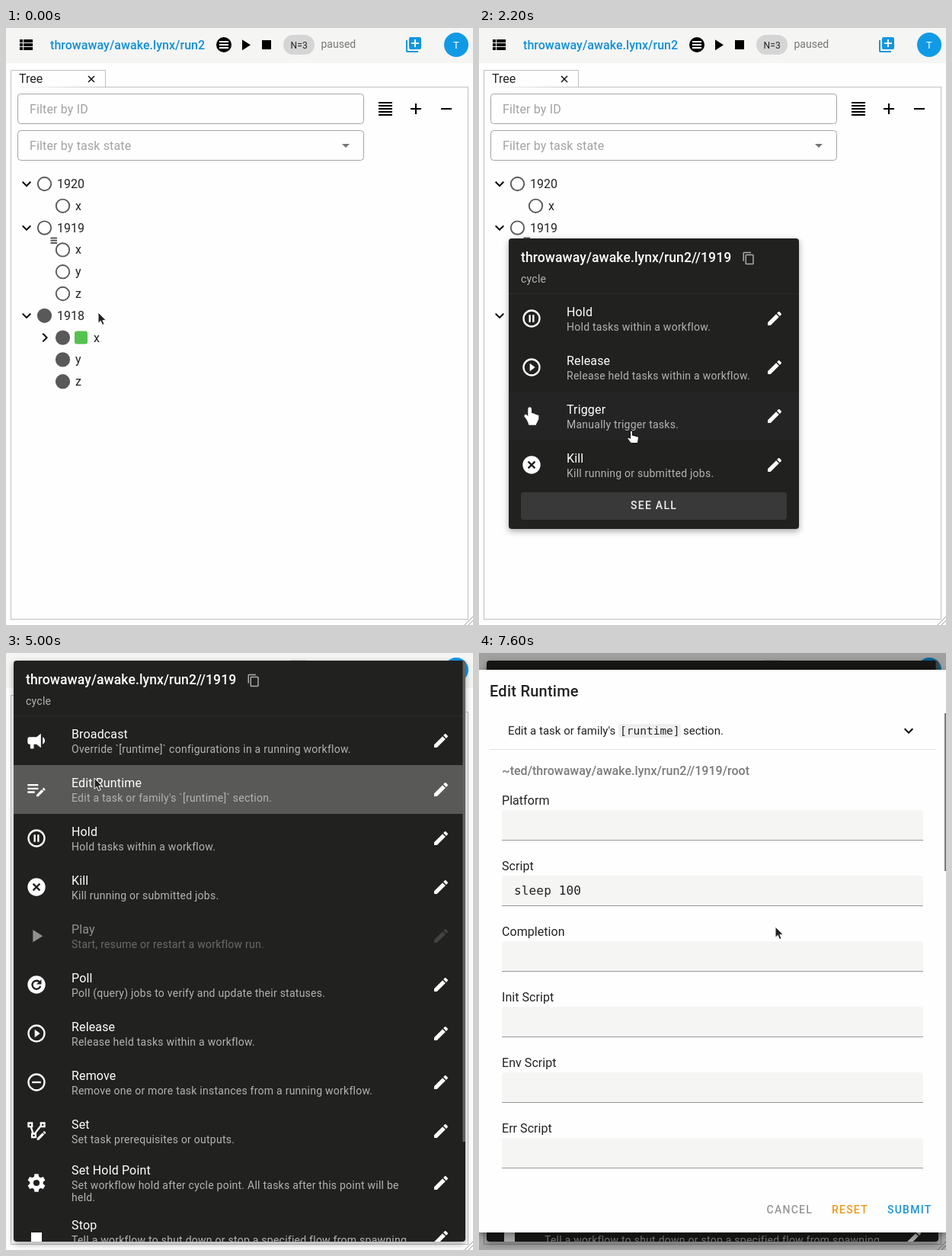
Recreate the animation shown at these times as an HTML page. Size 613x783 px, loop 8 s.

```html
<!DOCTYPE html>
<html lang="en">
<head>
<meta charset="utf-8">
<title>Workflow tree</title>
<style>
html, body { margin: 0; width: 100%; height: 100%; overflow: hidden; background: #fefefe; }
svg { display: block; width: 613px; height: 783px; font-family: Roboto, sans-serif; }
text { white-space: pre; }
.mono { font-family: "DejaVu Sans Mono", monospace; }
.card { filter: drop-shadow(0 3px 4px rgba(0,0,0,.35)); }
</style>
</head>
<body>
<svg id="stage" viewBox="0 0 613 783"></svg>
<script>
const INK = '#222', BLUE = '#1190d8', GREY = '#595959', DARK = '#212120';

const text = (x, y, s, size = 16, fill = INK, o = '') =>
  `<text x="${x}" y="${y}" font-size="${size}" fill="${fill}" ${o}>${s}</text>`;
const rect = (x, y, w, h, fill, o = '') =>
  `<rect x="${x}" y="${y}" width="${w}" height="${h}" fill="${fill}" ${o}/>`;
const path = (d, o = '') => `<path d="${d}" ${o}/>`;
const ring = (cx, cy, r, w) =>
  `<circle cx="${cx}" cy="${cy}" r="${r}" fill="none" stroke="currentColor" stroke-width="${w}"/>`;
const sp = n => `letter-spacing="${n}"`;
const medium = (n = 0) => `font-weight="500" ${sp(n)}`;

const pencil = 'M20.7 7c.4-.4.4-1 0-1.4l-2.3-2.3c-.4-.4-1-.4-1.4 0l-1.9 1.8 3.8 3.8M3 17.25V21h3.75L17.8 9.93l-3.74-3.75Z';
const disc = '<circle cx="12" cy="12" r="10"/>';
const teeth = [0, 60, 120].map(a =>
  `<path d="M9.8 2h4.4l.9 5v10l-.9 5H9.8l-.9-5V7Z" transform="rotate(${a} 12 12)"/>`).join('');

const icons = {
  pencil: path(pencil),
  views: path('M9 5v4h12V5M9 19h12v-4H9M9 14h12v-4H9M4 9h4V5H4M4 19h4v-4H4M4 14h4v-4H4'),
  play: path('M8 5.14v14l11-7Z'),
  stop: path('M6 6h12v12H6Z'),
  lines: path('M3 3h18v2H3ZM3 7h18v2H3ZM3 11h18v2H3ZM3 15h18v2H3ZM3 19h18v2H3Z'),
  plus: path('M19 13h-6v6h-2v-6H5v-2h6V5h2v6h6Z'),
  minus: path('M19 13H5v-2h14Z'),
  down: path('M7.4 8.6 12 13.2l4.6-4.6L18 10l-6 6-6-6Z'),
  right: path('M8.6 16.6 13.2 12 8.6 7.4 10 6l6 6-6 6Z'),
  addTab: path('M19 11h-4v4h-2v-4H9V9h4V5h2v4h4M20 2H8a2 2 0 0 0-2 2v12a2 2 0 0 0 2 2h12a2 2 0 0 0 2-2V4a2 2 0 0 0-2-2M4 6H2v14a2 2 0 0 0 2 2h14v-2H4Z', 'fill-rule="evenodd"'),
  menu: disc + path('M6 8h12M6 12h12M6 16h12', 'stroke="#fff" stroke-width="2"'),
  copy: path('M19 21H8V7h11m0-2H8a2 2 0 0 0-2 2v14a2 2 0 0 0 2 2h11a2 2 0 0 0 2-2V7a2 2 0 0 0-2-2m-3-4H4a2 2 0 0 0-2 2v14h2V3h12Z'),
  Broadcast: path('M12 8H4a2 2 0 0 0-2 2v4a2 2 0 0 0 2 2h1v4a1 1 0 0 0 1 1h2a1 1 0 0 0 1-1v-4h3l5 4V4l-5 4m9.5 4c0 1.7-1 3.3-2.5 4V8c1.5.8 2.5 2.3 2.5 4Z'),
  'Edit Runtime': path('M2 6v2h12V6H2m0 4v2h12v-2H2m18-.1-1.4 1.4 2.1 2.1 1.2-1.2V11.7L20.4 10.2M18 11.9l-6 6V20h2.1l6-6-2.1-2.1M2 14v2h8v-2Z'),
  Hold: ring(12, 12, 9, 2) + path('M9 8h2v8H9Zm4 0h2v8h-2Z'),
  Kill: disc + path('M8.2 8.2l7.6 7.6m0-7.6-7.6 7.6', `stroke="${DARK}" stroke-width="2"`),
  Play: path('M8 5.14v14l11-7Z'),
  Poll: disc + path('M15.6 9.2A4.7 4.7 0 1 0 16.5 13.5', `fill="none" stroke="${DARK}" stroke-width="2"`) +
    path('M17.5 6v5.5H12Z', `fill="${DARK}"`),
  Release: ring(12, 12, 9, 2) + path('M10 7.5v9l6-4.5Z'),
  Remove: ring(12, 12, 9, 2) + path('M7 11h10v2H7Z'),
  Trigger: path('M10 2a2 2 0 0 1 2 2v4.5s2-.25 2 .75c0 0 2-.25 2 .75 0 0 2-.25 2 .75 0 0 2-.25 2 .75V15c0 1-3 6-3 7H9s-2-7-5-9c0 0-1-6 4-1V4a2 2 0 0 1 2-2Z'),
  Set: path('M3 3h4v4H3ZM17 3h4v4h-4ZM7 15h4v4H7ZM5.6 7l2.7 8M17 6l-7 9', 'fill="none" stroke="currentColor" stroke-width="2"') +
    `<g transform="translate(11 10.5) scale(.55)">${path(pencil)}</g>`,
  'Set Hold Point': teeth + `<circle cx="12" cy="12" r="7.5"/><circle cx="12" cy="12" r="3.5" fill="${DARK}"/>`,
  Stop: path('M6 6h12v12H6Z')
};
const icon = (name, cx, cy, color = '#000', size = 24) => {
  const s = size / 24;
  return `<g transform="translate(${cx - 12 * s} ${cy - 12 * s}) scale(${s})" fill="${color}" color="${color}">${icons[name]}</g>`;
};

// Main page
const node = (row, depth, label, full, arrow, job) => {
  const y = 204.5 + row * 28.8, x = 50.5 + depth * 24;
  return (arrow ? icon(arrow, x - 23.5, y) : '') +
    (full ? `<circle cx="${x}" cy="${y}" r="9.6" fill="${GREY}"/>`
      : `<g color="${GREY}">${ring(x, y, 8.7, 1.9)}</g>`) +
    (job ? rect(x + 15.5, y - 8.5, 17, 17, '#55c24f', 'rx="3"') : '') +
    text(x + (job ? 40.5 : 16.5), y + 5.5, label);
};
const edge = 'stroke="#c0c0c0"';
const page = rect(0, 0, 613, 783, '#fefefe') + rect(0, 0, 613, 46, '#f5f5f4') +
  icon('views', 26, 22) + text(58, 28, 'throwaway/awake.lynx/run2', 16, BLUE, medium(.05)) +
  icon('menu', 286, 22) + icon('play', 314, 22) + icon('stop', 342, 22) +
  rect(364, 9, 41, 26, '#d5d5d5', 'rx="13"') + text(373.5, 27, 'N=3', 12, INK, sp(.2)) +
  text(413.5, 26, 'paused', 14, '#757575') + icon('addTab', 535, 22, '#1097e0') +
  '<circle cx="591" cy="22" r="16" fill="#109ae6"/>' + text(591, 27, 'T', 13, '#fff', 'text-anchor="middle"') +
  rect(6.5, 77.5, 600, 698, 'none', edge) + path('M6.5 78V55.5h124V77', `fill="#fefefe" ${edge}`) +
  text(17, 72, 'Tree') + path('M108 63l8 8m0-8-8 8', 'stroke="#111" stroke-width="1.5"') +
  [86.5, 134.5].map(y => rect(15.5, y, 454, 39, 'none', 'rx="4" stroke="#a4a4a4"')).join('') +
  text(31, 112, 'Filter by ID', 16, '#a2a2a2', sp(.15)) + text(31, 160, 'Filter by task state', 16, '#a2a2a2', sp(.15)) +
  path('M441 152h10l-5 5Z', 'fill="#757575"') +
  icon('lines', 498, 106) + icon('plus', 538, 106) + icon('minus', 578, 106) +
  node(0, 0, '1920', 0, 'down') + node(1, 1, 'x') + node(2, 0, '1919', 0, 'down') +
  path('M58.5 275.5h8.5M58.5 278.7h8.5M58.5 281.9h8.5', `stroke="${GREY}" stroke-width="2"`) +
  node(3, 1, 'x') + node(4, 1, 'y') + node(5, 1, 'z') +
  node(6, 0, '1918', 1, 'down') + node(7, 1, 'x', 1, 'right', 1) + node(8, 1, 'y', 1) + node(9, 1, 'z', 1) +
  path('M602 783l11-11M607 783l6-6', 'stroke="#999"');

// Command menus
const about = {
  Broadcast: ['Override `[runtime]` configurations in a running workflow.'],
  'Edit Runtime': ["Edit a task or family's `[runtime]` section."],
  Hold: ['Hold tasks within a workflow.'],
  Kill: ['Kill running or submitted jobs.'],
  Play: ['Start, resume or restart a workflow run.'],
  Poll: ['Poll (query) jobs to verify and update their statuses.'],
  Release: ['Release held tasks within a workflow.'],
  Remove: ['Remove one or more task instances from a running workflow.'],
  Set: ['Set task prerequisites or outputs.'],
  'Set Hold Point': ['Set workflow hold after cycle point. All tasks after this point will be', 'held.'],
  Stop: ['Tell a workflow to shut down or stop a specified flow from spawning', 'new tasks.'],
  Trigger: ['Manually trigger tasks.']
};
const menu = (id, w, h, names) => {
  let y = 73;
  const rows = names.map(name => {
    const lines = about[name], tall = lines.length > 1, off = name === 'Play';
    const mid = y + (tall ? 36 : 32);
    y += tall ? 72 : 64;
    return `<g opacity="${off ? .5 : 1}">` + icon(name, 30, mid, '#fff', 28) +
      text(76, mid - (tall ? 11 : 3), name, 16, '#fff', sp(.15)) +
      lines.map((s, i) => text(76, mid + (tall ? 8 : 16) + i * 16, s, 14, '#b3b3b2', sp(.25))).join('') +
      `<g opacity="${off ? .3 : 1}">${icon('pencil', w - 32, mid, '#fff')}</g></g>`;
  }).join('');
  return `<g id="${id}"><g class="card">${rect(0, 0, w, h, DARK, 'rx="4"')}</g>` +
    `<clipPath id="${id}Clip">${rect(0, 0, w, h, '#000', 'rx="4"')}</clipPath><g clip-path="url(#${id}Clip)">` +
    rect(0, 0, w, 64, '#fff', `id="${id}Hover" opacity="0"`) +
    text(16, 31, 'throwaway/awake.lynx/run2//1919', 17.6, '#fff', medium(.08)) +
    icon('copy', w === 381 ? 315 : 315, 26, '#aaa', 18) +
    text(16, 57.5, 'cycle', 14, '#b3b3b2', sp(.25)) + rect(0, 72, w, 1, '#2d2d2c') + rows +
    (id === 'small' ? rect(16, 333, 349, 36, '#383938', 'rx="4" id="seeAll"') +
      text(190.6, 355, 'SEE ALL', 14, '#eee', medium(1.25) + ' text-anchor="middle"')
      : rect(589.5, 0, 3.5, 631, '#626262', 'id="bar"')) + '</g></g>';
};

// Edit dialog
const fields = ['Platform', 'Script', 'Completion', 'Init Script', 'Env Script', 'Err Script'];
const field = (name, i) => {
  const y = 206 + i * 86;
  return text(30, y - 7, name, 16, INK, sp(.05)) +
    path(`M30 ${y + 39}V${y + 4}q0-4 4-4H579q4 0 4 4V${y + 39}Z`, `id="field${i}" fill="#f5f5f4"`) +
    rect(30, y + 39, 553, 1, '#989898');
};
const place = fill => text(30, 160, '~ted/throwaway/awake.lynx/run2//1919/root', 16, fill, medium(.02));
const dialog = '<g id="dialog">' +
  `<g class="card">${rect(-2, 22, 617, 738, '#fefefe', 'rx="4"')}</g>` +
  text(14, 56.7, 'Edit Runtime', 20, INK, medium(.25)) +
  text(38, 107, "Edit a task or family's", 15) + rect(183, 93, 82, 18, '#efefef', 'rx="3"') +
  text(185, 107, '[runtime]', 14.5, INK, 'class="mono"') + text(268, 107, 'section.', 15) +
  icon('down', 564, 102) + rect(14, 126, 585, 1, '#e4e4e4') + place('#7b7b7b') +
  '<clipPath id="selClip"><rect id="selBox" y="146" height="18"/></clipPath>' +
  `<g clip-path="url(#selClip)">${rect(300, 146, 90, 18, '#86b5e3')}${place('#fff')}</g>` +
  fields.map(field).join('') + text(46, 317, 'sleep 100', 16, INK, `class="mono" ${sp(.15)}`) +
  text(377.5, 735, 'CANCEL', 14, '#969696', medium(1.25)) + text(463, 735, 'RESET', 14, '#f0981a', medium(1.25)) +
  text(536, 735, 'SUBMIT', 14, '#1c94d8', medium(1.25)) + rect(611, 79, 3, 207, '#7a7a7a') + '</g>';

// Pointer shapes, hot spot at 0,0
const pointer = '<g id="pointer">' +
  path('M0 0V14.3l3.3-3 2.2 5.2 2.6-1.1-2.2-5H10.3Z', 'id="arrow" fill="#222" stroke="#fff"') +
  path('M-1.5 1q1.5-2 3 0v5.2l6.6 1.6q1.6.5 1.3 2.2l-1 6.5H-.8L-5 10.6q-.6-1.8 1.2-1.6l2.3 1.4Z', 'id="hand" fill="#fff" stroke="#111"') +
  path('M-3-8H-1L0-7 1-8H3M0-7V7M-3 8H-1L0 7 1 8H3', 'id="beam" fill="none" stroke="#222" stroke-width="1.4"') + '</g>';

document.getElementById('stage').innerHTML = page +
  `<g id="ghost" class="card">${rect(39, 276, 254, 256, DARK, 'rx="4"')}</g>` +
  menu('small', 381, 381, ['Hold', 'Release', 'Trigger', 'Kill']) +
  menu('large', 593, 762, Object.keys(about).slice(0, 11)) +
  rect(0, 0, 613, 783, '#000', 'id="scrim"') + dialog + pointer;

const $ = id => document.getElementById(id);
const set = (id, o) => { for (const k in o) $(id).setAttribute(k, o[k]); };
const show = (id, on) => set(id, { display: on ? 'inline' : 'none' });
const ramp = (t, a, b) => Math.min(1, Math.max(0, (t - a) / (b - a)));
const easeOut = p => 1 - (1 - p) ** 3;

// Pointer path: time, x, y, shape
const moves = [
  [0, 121, 373, 'arrow'], [600, 121, 373, 'arrow'], [900, 60, 284, 'arrow'], [1000, 60, 284, 'arrow'],
  [1200, 52, 252, 'hand'], [1300, 48, 260, 'hand'], [1900, 48, 260, 'hand'], [2200, 200, 528, 'hand'],
  [2400, 192, 575, 'hand'], [2600, 179, 619, 'hand'], [2900, 179, 620, 'hand'], [3600, 179, 614, 'hand'],
  [3800, 116, 164, 'hand'], [4900, 116, 164, 'arrow'], [5200, 116, 164, 'arrow'], [5500, 362, 310, 'arrow'],
  [5800, 366, 388, 'beam'], [5900, 366, 388, 'beam'], [6200, 364, 161, 'beam'], [6400, 364, 161, 'beam'],
  [6500, 368, 162, 'beam'], [6600, 368, 162, 'beam'], [7000, 331, 159, 'beam'], [7100, 331, 159, 'beam'],
  [7200, 329, 161, 'beam'], [7400, 329, 161, 'beam'], [7600, 389, 359, 'arrow'], [8000, 389, 359, 'arrow']
];
const pointerAt = t => {
  const i = moves.findIndex((m, k) => k === moves.length - 1 || moves[k + 1][0] > t);
  const a = moves[i], b = moves[i + 1] || a, p = ramp(t, a[0], b[0] + (a === b));
  return { x: a[1] + (b[1] - a[1]) * p, y: a[2] + (b[2] - a[2]) * p, shape: a[3] };
};
const hover = (id, top, rows, y, glow) => {
  const i = Math.floor((y - top - 73) / 64);
  set(id + 'Hover', { y: 73 + i * 64, opacity: i >= 0 && i < rows ? glow : 0 });
};

function draw(t) {
  const c = pointerAt(t);
  set('pointer', { transform: `translate(${c.x} ${c.y})` });
  for (const s of ['arrow', 'hand', 'beam']) show(s, s === c.shape);

  show('ghost', t >= 1700 && t < 2000);
  set('ghost', { opacity: [.25, .65, .93][Math.floor((t - 1700) / 100)] || 0 });
  show('small', t >= 2000 && t < 2800);
  set('small', { transform: 'translate(39 276)' });
  hover('small', 276, 4, c.y, .015);
  set('seeAll', { fill: c.y > 609 ? '#404140' : '#383938' });

  const settled = t >= 3000;
  show('large', t >= 2800);
  set('large', { transform: `translate(${settled ? 10 : 15} 10)` });
  show('bar', settled);
  hover('large', 10, 9, c.y, t < 5100 ? .02 + .23 * ramp(t, 4600, 4900) : 0);

  const p = easeOut(ramp(t, 5040, 5310)), s = .9 + .1 * p;
  show('scrim', p > 0);
  set('scrim', { opacity: .35 * p });
  show('dialog', p > 0);
  set('dialog', { opacity: p, transform: `translate(306.5 391) scale(${s}) translate(-306.5 -391)` });
  fields.forEach((_, i) => {
    const top = 206 + i * 86, over = t >= 5300 && c.y >= top && c.y < top + 40;
    set('field' + i, { fill: over ? '#ebebea' : '#f5f5f4' });
  });
  const left = t < 6700 ? 361 : Math.max(331, Math.min(361, c.x));
  set('selBox', { x: left, width: 361 - left });
}

function tick(now) {
  draw(Math.floor(now % 8000 / 100) * 100);
  requestAnimationFrame(tick);
}
draw(0);
requestAnimationFrame(tick);
</script>
</body>
</html>
```
